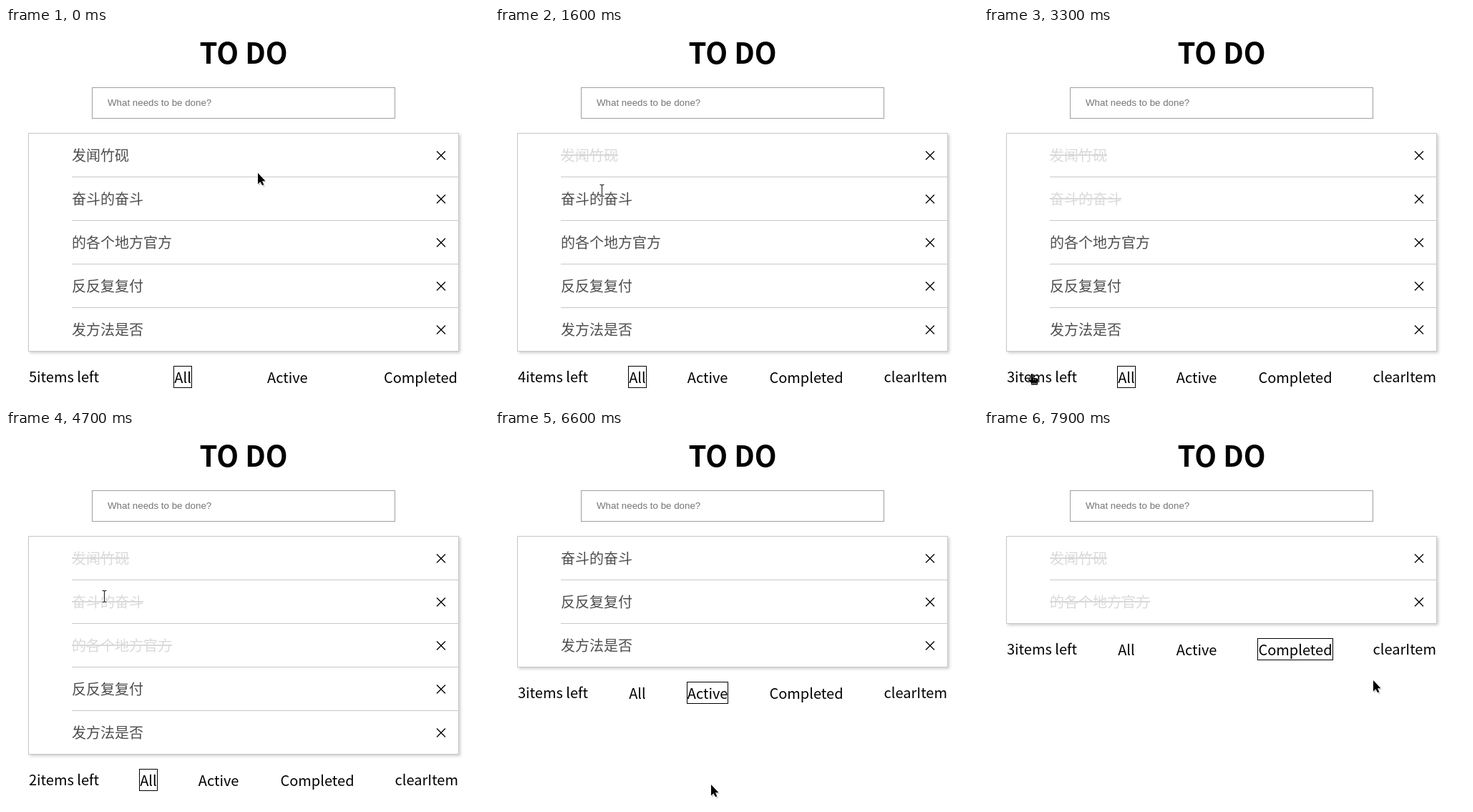
Animation, 675 px wide and 525 px high, one loop 8 s. Source, as an HTML page:

```html
<!DOCTYPE html>
<html lang="zh-CN">
<head>
<meta charset="utf-8">
<title>TO DO</title>
<style>
  html, body { margin: 0; width: 100%; height: 100%; overflow: hidden; background: #fff; }
  body { position: relative; color: #000; font: 20px/29px "Noto Sans CJK SC", "Noto Sans CJK", sans-serif; white-space: nowrap; }
  h1 { position: absolute; left: 32px; top: 4px; width: 600px; margin: 0; font-size: 40px; line-height: 58px; font-weight: bold; text-align: center; }
  .entry { position: absolute; left: 120px; top: 83px; width: 402px; height: 42px; padding-left: 21px; border: 1px solid #a0a0a0; box-sizing: content-box; font: 13.333px/42px "Liberation Sans", Arial, sans-serif; color: #757575; width: 401px; }
  .app { position: absolute; left: 31px; top: 147px; width: 602px; }
  .list { border: 1px solid #c8c8c8; box-shadow: 2px 2px 4px rgba(0, 0, 0, .2); background: #fff; }
  .item { position: relative; height: 60px; line-height: 59px; margin-left: 60px; color: #4d4d4d; }
  .item + .item { border-top: 1px solid #c8c8c8; }
  .item.done span { color: #d9d9d9; text-decoration: line-through; }
  .item b { position: absolute; right: 4px; top: 0; width: 40px; text-align: center; font-weight: normal; color: #000; }
  .foot { display: flex; justify-content: space-between; align-items: flex-start; margin: 20px 1px 0; }
  .tab { border: 1px solid transparent; }
  .tab.on { border-color: #000; }
  svg { position: absolute; left: 0; top: 0; width: 24px; height: 24px; overflow: visible; }
  svg g { display: none; }
</style>
</head>
<body>
<h1>TO DO</h1>
<div class="entry">What needs to be done?</div>
<div class="app"><div class="list"></div><div class="foot"></div></div>
<svg id="cursor">
  <g id="arrow">
    <path d="M1 2V18L5 14.5 7.500 19.500 10 18.500 7.500 13H12Z" fill="#000" opacity=".18"/>
    <path d="M0 0V15.500L3.500 12.300 6 17.300 8.300 16.300 6 11.300H10.500Z" fill="#000" stroke="#fff" stroke-width="1" paint-order="stroke"/>
  </g>
  <g id="beam">
    <path d="M-3 -8H-1L0 -7 1 -8H3M0 -7V7M-3 8H-1L0 7 1 8H3" transform="translate(.5 .5)" fill="none" stroke="#fff" stroke-width="2.600"/>
    <path d="M-3 -8H-1L0 -7 1 -8H3M0 -7V7M-3 8H-1L0 7 1 8H3" transform="translate(.5 .5)" fill="none" stroke="#222" stroke-width="1.100"/>
  </g>
  <g id="hand">
    <path d="M-1.500 1Q0 -1 1.500 1V5.500L7 6.500Q9 7 9 9L8 13V15.500H-1V13L-5 9Q-5.500 7 -3.500 7.500L-1.500 9Z" fill="#000" stroke="#fff" stroke-width="1" paint-order="stroke"/>
    <path d="M2.500 7V9M5 7.500V9.500M0 13.500H7" fill="none" stroke="#fff" stroke-width=".6"/>
  </g>
</svg>
<script>
const LOOP = 8000, STEP = 100;
const items = ["发闻竹砚", "奋斗的奋斗", "的各个地方官方", "反反复复付", "发方法是否"];
const tabs = ["All", "Active", "Completed"];

// time, finished items, open tab
const states = [
  [0, [], "All"],
  [1100, [0], "All"],
  [1900, [0, 1], "All"],
  [4000, [0, 1, 2], "All"],
  [4900, [0, 2], "All"],
  [6600, [0, 2], "Active"],
  [7600, [0, 2], "Completed"]
];

// time, x, y, pointer shape from then on
const path = [
  [0, 352, 203, "arrow"], [100, 352, 203, "arrow"],
  [300, 300, 224, "arrow"], [400, 245, 225, "arrow"],
  [600, 156, 186, "beam"], [700, 145, 172, "beam"],
  [1100, 145, 172, "beam"], [1300, 146, 194, "arrow"], [1600, 149, 227, "beam"],
  [1900, 149, 227, "beam"], [2100, 135, 275, "arrow"], [2500, 70, 440, "arrow"], [2700, 40, 488, "arrow"],
  [2900, 3, 506, "arrow"], [3100, 22, 507, "arrow"], [3300, 67, 484, "hand"],
  [3400, 105, 390, "arrow"], [3500, 138, 285, "beam"], [3600, 149, 288, "beam"],
  [3700, 169, 281, "beam"], [4000, 169, 281, "beam"],
  [4300, 158, 264, "arrow"], [4500, 143, 240, "beam"], [4700, 137, 231, "beam"],
  [4900, 137, 231, "beam"], [5200, 149, 256, "arrow"], [5400, 164, 288, "beam"], [5600, 177, 309, "beam"],
  [5700, 199, 335, "arrow"], [6100, 284, 474, "arrow"], [6200, 296, 495, "hand"],
  [6500, 296, 495, "hand"], [6600, 302, 495, "arrow"],
  [7000, 392, 416, "arrow"], [7200, 426, 378, "hand"], [7300, 435, 370, "hand"],
  [7600, 438, 375, "arrow"], [7700, 480, 443, "arrow"], [7800, 524, 410, "arrow"], [7900, 544, 349, "arrow"]
];

const $ = s => document.querySelector(s);
const list = $(".list"), foot = $(".foot"), cursor = $("#cursor");
const lastAt = (rows, t) => rows.findLastIndex(r => r[0] <= t);
let shown = -1;

function showState(n) {
  if (n === shown) return;
  shown = n;
  const [, done, tab] = states[n];
  const isDone = i => done.includes(i);
  list.innerHTML = items.map((text, i) => {
    if (tab !== "All" && isDone(i) !== (tab === "Completed")) return "";
    return `<div class="item${isDone(i) ? " done" : ""}"><span>${text}</span><b>×</b></div>`;
  }).join("");
  foot.innerHTML = `<span>${items.length - done.length}items left</span>` +
    tabs.map(name => `<span class="tab${name === tab ? " on" : ""}">${name}</span>`).join("") +
    (done.length ? "<span>clearItem</span>" : "");
}

function showCursor(t) {
  const n = lastAt(path, t), a = path[n], b = path[n + 1] || a;
  const k = b === a ? 0 : (t - a[0]) / (b[0] - a[0]);
  const mix = i => Math.round(a[i] + (b[i] - a[i]) * k);
  cursor.style.transform = `translate(${mix(1)}px, ${mix(2)}px)`;
  for (const g of cursor.children) g.style.display = g.id === a[3] ? "inline" : "none";
}

function draw(now) {
  const t = Math.floor((now % LOOP) / STEP) * STEP;
  showState(lastAt(states, t));
  showCursor(t);
}

const start = performance.now();
function tick() {
  draw(Math.max(0, performance.now() - start));
  requestAnimationFrame(tick);
}
tick();
</script>
</body>
</html>
```
